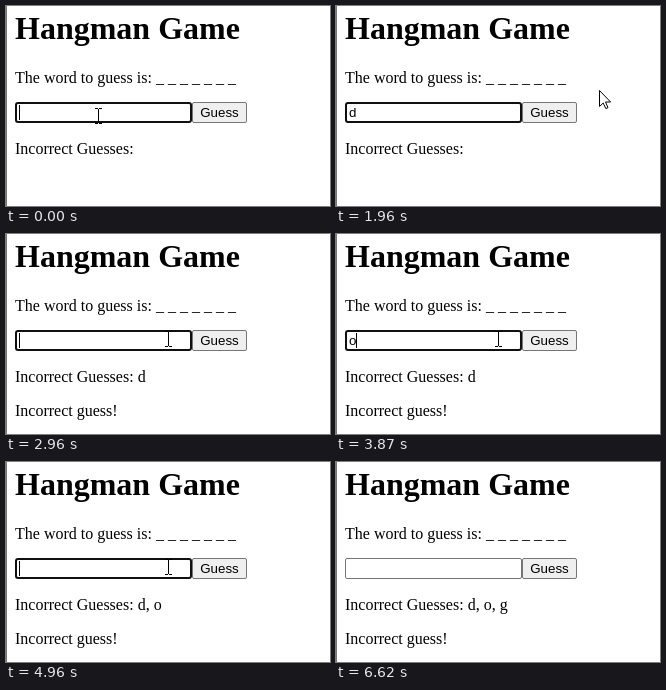
Recreate the animation shown at these times as an HTML page. Size 324x200 px, loop 8000 ms.

```html
<!DOCTYPE html>
<html lang="en">
<head>
<meta charset="utf-8">
<title>Hangman Game</title>
<style>
  html, body { margin: 0; width: 100%; height: 100%; overflow: hidden; background: #fff; }
  #stage { position: relative; width: 324px; height: 200px; overflow: hidden; background: #fff; color: #000;
    font: 16px/18px "Liberation Serif", "Times New Roman", serif; }
  #stage > * { position: absolute; margin: 0; box-sizing: border-box; white-space: pre; }
  .edge { left: 0; top: 0; width: 1px; height: 200px; background: #777; }
  h1 { left: 9px; top: 4px; font-size: 32px; line-height: 37px; }
  p { left: 9px; }
  #field, #button { top: 96px; height: 21px; font: 13.333px/15px "Liberation Sans", Arial, sans-serif; }
  #field { left: 9px; width: 177px; padding: 2px 3px; border: 1px solid #767676; border-radius: 2px; }
  #field.focus { padding: 1px 2px; border: 2px solid #101010; border-radius: 3px; }
  #caret { top: 99px; width: 1px; height: 15px; background: #000; }
  #button { left: 186px; width: 55px; padding: 2px 0; text-align: center;
    background: #efefef; border: 1px solid #767676; border-radius: 2px; }
  #button.hover { background: #e5e5e5; border-color: #4f4f4f; }
  #button.down { background: #f5f5f5; border-color: #8d8d8d; }
  svg { left: 0; top: 0; overflow: visible; }
</style>
</head>
<body>
<div id="stage">
  <div class="edge"></div>
  <h1>Hangman Game</h1>
  <p style="top:63px">The word to guess is: _ _ _ _ _ _ _</p>
  <div id="field"></div>
  <div id="button">Guess</div>
  <div id="caret"></div>
  <p style="top:134px">Incorrect Guesses: <span id="misses"></span></p>
  <p style="top:168px" id="message">Incorrect guess!</p>
  <svg id="arrow" width="13" height="20"><path d="M.5.5V16.5L4.2 13L6.8 18.6L9 17.6L6.5 12H11.6Z" fill="#fff" stroke="#000"/></svg>
  <svg id="beam" width="8" height="16"><path d="M0 .5H3M4 .5H7M3.5 1V15M0 15.5H3M4 15.5H7" fill="none" stroke="#000"/></svg>
</div>
<script>
  const LOOP = 8000, BLINK = 530, TICK = 75;
  const $ = id => document.getElementById(id);

  // Each guess: type a letter, press and release the button, click back into the field.
  const guesses = [
    { letter: "d", type: 1230, press: 2330, release: 2500, focus: 2960 },
    { letter: "o", type: 3870, press: 4430, release: 4520, focus: 4960 },
    { letter: "g", type: 5550, press: 6230, release: 6390, focus: Infinity }
  ];

  // Pointer strokes; "via" bends the path.
  const home = [92, 109], field = [162, 104];
  const strokes = [
    { start: 1660, ticks: 4, to: [263, 84], via: [210, 78] },
    { start: 1960, ticks: 4, to: [213, 104], via: [325, 150] },
    { start: 2500, ticks: 4, to: field },
    { start: 3885, ticks: 3, to: [231, 104] },
    { start: 4520, ticks: 5, to: field },
    { start: 5545, ticks: 5, to: [221, 98] },
    { start: 5920, ticks: 3, to: [222, 105] },
    { start: 6390, ticks: 3, to: [214, 230] }
  ];

  const ease = u => u * u * (3 - 2 * u);
  const show = (el, on) => el.style.visibility = on ? "visible" : "hidden";
  const move = (el, x, y) => el.style.transform = `translate(${x}px, ${y}px)`;

  function pointerAt(t) {
    let from = home;
    for (const { start, ticks, to, via } of strokes) {
      const tick = Math.floor((t - start) / TICK);
      if (tick < 0) break;
      if (tick < ticks) {
        const u = ease(tick / ticks);
        return from.map((a, i) => {
          const mid = via ? via[i] : (a + to[i]) / 2;
          return Math.round((1 - u) ** 2 * a + 2 * u * (1 - u) * mid + u * u * to[i]);
        });
      }
      from = to;
    }
    return from;
  }

  function draw(t) {
    const [x, y] = pointerAt(t);
    const inRow = y >= 96 && y < 117;
    const overField = inRow && x >= 9 && x < 186;
    const overButton = inRow && x >= 186 && x < 241;

    const during = (from, to) => guesses.find(g => g[from] <= t && t < g[to]);
    const text = during("type", "release")?.letter ?? "";
    const focused = !during("press", "focus");
    const pressed = during("press", "release");
    const misses = guesses.filter(g => g.release <= t).map(g => g.letter).join(", ");

    const resets = guesses.flatMap(g => [g.type, g.focus]).filter(s => s <= t);
    const lastReset = Math.max(70 - BLINK, ...resets);
    const lit = Math.floor((t - lastReset) / BLINK) % 2 === 0;

    $("field").textContent = text;
    $("field").className = focused ? "focus" : "";
    $("caret").style.left = 13 + 7 * text.length + "px";
    show($("caret"), focused && lit);
    $("misses").textContent = misses;
    show($("message"), misses);
    $("button").className = pressed ? "down" : overButton ? "hover" : "";
    show($("beam"), overField);
    show($("arrow"), !overField);
    move($("beam"), x - 3, y - 7);
    move($("arrow"), x, y);
  }

  const start = performance.now();
  function tick() {
    draw((performance.now() - start) % LOOP);
    requestAnimationFrame(tick);
  }
  draw(0);
  requestAnimationFrame(tick);
</script>
</body>
</html>
```
